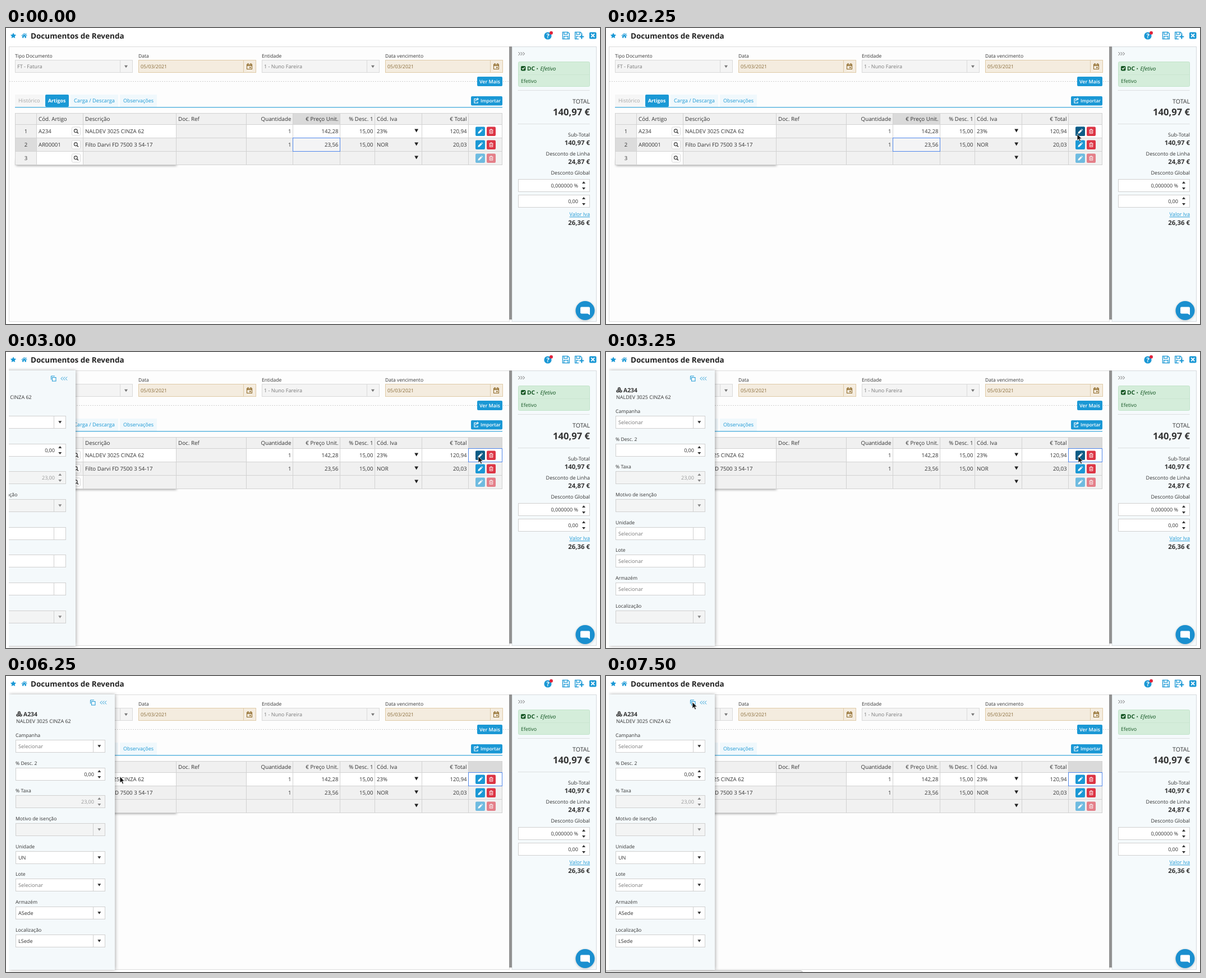
Write an HTML page that moves like this. It is 1059 px wide and 529 px high and loops after 8000 ms.

```html
<!DOCTYPE html>
<html lang="pt">
<head>
<meta charset="utf-8">
<title>Documentos de Revenda</title>
<style>
  html, body { margin: 0; width: 100%; height: 100%; overflow: hidden; background: #fff; }
  svg { display: block; width: 1059px; height: 529px; }
  text { font-family: "Open Sans", "Noto Sans", sans-serif; text-rendering: geometricPrecision; white-space: pre; }
</style>
</head>
<body>
<svg id="stage" viewBox="0 0 1059 529"></svg>
<script>
const LOOP = 8000;
const BLUE = '#1a98d5', RED = '#dc3545', INK = '#333', MUTED = '#777', LINE = '#d2d2d2';

// Drawing helpers: each returns SVG markup.
const rect = (x, y, w, h, fill, stroke = 'none', more = '') =>
  `<rect x="${x}" y="${y}" width="${w}" height="${h}" fill="${fill}" stroke="${stroke}" ${more}/>`;
const path = (d, fill, stroke = 'none', more = '') =>
  `<path d="${d}" fill="${fill}" stroke="${stroke}" ${more}/>`;
const line = (d, color, more = '') => path(d, 'none', color, more);
const text = (x, y, s, size = 9.1, fill = INK, more = '') =>
  `<text x="${x}" y="${y}" font-size="${size}" fill="${fill}" ${more}>${s}</text>`;
const right = (x, y, s, size = 9.1, fill = INK, more = '') =>
  text(x, y, s, size, fill, `text-anchor="end" ${more}`);
const group = (id, body, more = '') => `<g id="${id}" ${more}>${body}</g>`;
const at = (x, y, body) => `<g transform="translate(${x} ${y})">${body}</g>`;
const bold = 'font-weight="700"', semi = 'font-weight="600"', round = 'rx="2"';

const down = (x, y, color = INK, w = 3, h = 4.5) =>
  path(`M${x - w} ${y - h / 2}h${2 * w}l${-w} ${h}z`, color);
const up = (x, y, color) => down(x, y, color, 3, -4);
const spinner = (x, y, color) => up(x, y - 5.5, color) + down(x, y + 5.5, color, 3, 4);
const chevrons = (x, y, dir, color) => [0, 4, 8].map(d =>
  line(`M${x + d} ${y - 3}l${3 * dir} 3l${-3 * dir} 3`, color, 'stroke-width="1"')).join('');

function topBar() {
  const floppy = line('M.6 .6h9.4l2.6 2.6v9.6h-12zM3 .6v4h6v-4M3 12.8v-5h7v5', BLUE, 'stroke-width="1.3"');
  return path('M13 8.6l1.6 3.2 3.5.5-2.5 2.5.6 3.5-3.2-1.7-3.2 1.7.6-3.5-2.5-2.5 3.5-.5z', BLUE) +
    path('M32.5 9.2l5.2 4.6-.7.8-4.5-4-4.5 4-.7-.8zM29.1 14.4l3.4-3 3.4 3v3.4h-2.4v-2.6h-2v2.6h-2.4zM35 9.7h1.3v2.2l-1.3-1.1z', BLUE) +
    text(44, 18.7, 'Documentos de Revenda', 13.5, '#222', bold) +
    `<circle cx="966" cy="14" r="6.6" fill="${BLUE}"/>` +
    text(966, 18, '?', 11, '#fff', bold + ' text-anchor="middle"') +
    '<circle cx="972" cy="8.8" r="3" fill="#e0243c"/>' +
    at(991.8, 6.8, floppy) + at(1014, 6.8, floppy) +
    rect(1021, 12, 10, 9, '#fff') +
    line('M1026.3 11.5v8M1022.3 15.5h8', BLUE, 'stroke-width="2.2"') +
    rect(1040, 7.5, 12.5, 12, BLUE, 'none', round) +
    line('M1043.2 10.4l6 6M1049.2 10.4l-6 6', '#fff', 'stroke-width="2"');
}

function headField(x, label, value, isDate) {
  const [fill, edge, ink] = isDate ? ['#f4ecdf', '#dfcaa6', '#8a6d3b'] : ['#f4f4f4', '#d9d9d9', '#777'];
  const cx = x + 198;
  const calendar = rect(cx - 4.5, 65, 9, 8.5, 'none', '#8a6420') +
    line(`M${cx - 4.5} 67h9M${cx - 2.5} 63v2.5M${cx + 2.5} 63v2.5`, '#8a6420', 'stroke-width="1.4"') +
    rect(cx + .2, 69.5, 2.4, 2.2, '#8a6420');
  return text(x, 52.7, label, 8.6) + rect(x + .5, 57.5, 209, 22, fill, edge) +
    line(`M${x + 187.5} 58v21`, edge) + text(x + 4, isDate ? 72.2 : 72, value, isDate ? 8.9 : 9.1, ink) +
    (isDate ? calendar : down(cx, 69, '#777'));
}

function mainTop() {
  const importIcon = line('M839 126.5h-4v7.5h6v-2.5M837.5 131c0-3 1-4 4-4M840 125l2 2-2 2', '#fff', 'stroke-width="1.2"');
  return rect(5.5, 33.5, 892, 491, '#fdfdfd', '#dcdcdc') +
    headField(16, 'Tipo Documento', 'FT - Fatura') + headField(236, 'Data', '05/03/2021', true) +
    headField(456, 'Entidade', '1 - Nuno Fareira') + headField(676, 'Data vencimento', '05/03/2021', true) +
    line('M6 95.5H896', '#cfcfcf', 'stroke-dasharray="2 2"') +
    rect(840, 87, 45, 17, BLUE, 'none', round) + text(844, 98.6, 'Ver Mais', 8.9, '#fff', semi) +
    rect(16, 119, 51, 22, '#f6f6f6') + text(22, 133, 'Histórico', 9.3, '#a5a5a5') +
    rect(70, 119, 42, 22, BLUE, 'none', round) + text(75, 133, 'Artigos', 8.8, '#fff', bold) +
    rect(115, 119, 85, 22, '#f0f8fc') + text(121, 133, 'Carga / Descarga', 9.25, BLUE) +
    rect(203, 119, 66, 22, '#f0f8fc') + text(209, 133, 'Observações', 9, BLUE) +
    rect(16, 141, 869, 1.5, '#5db5e0') +
    rect(829, 122, 56, 16.5, BLUE, 'none', round) + importIcon + text(846, 133.2, 'Importar', 8.3, '#fff', semi);
}

const COLS = [16.5, 54.5, 137.5, 303.5, 428.5, 511.5, 595.5, 657.5, 741.5, 824.5, 884.5];
const ROWS = [172.5, 196.5, 220.5];
const cell = (c, y, h, fill, span = 1, stroke = LINE) =>
  rect(COLS[c], y, COLS[c + span] - COLS[c], h, fill, stroke);
const cells = (from, to, y, h, fill) => {
  let out = '';
  for (let c = from; c < to; c++) out += cell(c, y, h, fill);
  return out;
};

const pencil = path('M-4 4l.6-2.8L1.2-3.4 3.4-1.2-1.2 3.4zM1.9-4.1l.8-.7 2.1 2.1-.7.8z', '#fff');
const bin = line('M-3.5-2.5h7M-1.2-2.7v-1.2h2.4v1.2M-2.7-2.3v5.8h5.4v-5.8M-.9-.6v2.8M.9-.6v2.8', '#fff', 'stroke-width=".9"');
const editButton = (y, fill) => rect(837, y, 17, 16.5, fill, 'none', round) + at(845.4, y + 8.3, pencil);

function table() {
  const heads = [[1, 'Cód. Artigo'], [2, 'Descrição'], [3, 'Doc. Ref'], [4, 'Quantidade', 1],
    [5, '€ Preço Unit.', 1], [6, '% Desc. 1', 1], [7, 'Cód. Iva'], [8, '€ Total', 1]];
  const data = [
    ['A234', 'NALDEV 3025 CINZA 62', '', '1', '142,28', '15,00', '23%', '120,94'],
    ['AR00001', 'Filto Darvi FD 7500 3 54-17', '', '1', '23,56', '15,00', 'NOR', '20,03'],
    []];
  const place = (c, y, s, toRight, size) =>
    toRight ? right(COLS[c + 1] - 3, y, s, size) : text(COLS[c] + 3.5, y, s, size);

  let out = rect(18, 236, 286, 10, '#999', 'none', 'style="filter:blur(2px)"');
  out += cells(0, 10, 152.5, 20, '#f0f0f0');
  out += cells(0, 1, 172.5, 24, '#f0f0f0') + cells(1, 10, 172.5, 24, '#fff') + cell(3, 172.5, 24, '#f1f1f1');
  out += cells(0, 10, 196.5, 24, '#f0f0f0');
  out += cells(0, 10, 220.5, 24, '#f1f1f1') + cell(1, 220.5, 24, '#fff');
  out += group('pickedPrice', cell(5, 152.5, 20, '#dadada') + cell(0, 196.5, 24, '#dcdcdc') +
    cell(5, 196.5, 24, '#f4f4f5', 1, '#4f86ea'));
  out += group('pickedRow', cells(0, 10, 172.5, 24, '#f0f0f0') + cell(0, 172.5, 24, '#dcdcdc'));
  out += group('pickedTools', cell(9, 152.5, 20, '#dadada') + cell(9, 172.5, 24, 'none', 1, '#4f86ea'));
  heads.forEach(([c, s, r]) => out += place(c, 165.7, s, r, 9.8));

  ROWS.forEach((y, i) => {
    const base = y + 15;
    out += text(35.5, base, i + 1, 9.6, INK, 'text-anchor="middle"');
    data[i].forEach((s, k) => out += place(k + 1, base, s, [3, 4, 5, 7].includes(k), 9.7));
    out += rect(117.5, y + 4.5, 15, 15, '#fff', '#d8d8d8', round) +
      `<circle cx="124.3" cy="${y + 11.3}" r="2.9" fill="none" stroke="#333" stroke-width="1.1"/>` +
      line(`M126.4 ${y + 13.4}l2.6 2.6`, INK, 'stroke-width="1.4"') +
      down(731.7, y + 11, '#222', 3.4, 6);
    const tools = editButton(y + 4, BLUE) + rect(857, y + 4, 16, 16.5, RED, 'none', round) + at(865, y + 12.3, bin);
    out += `<g opacity="${i < 2 ? 1 : .6}">${tools}</g>`;
  });
  return out + group('pressed', editButton(176.5, '#0d5c86'));
}

function sideBar() {
  const spin = (y, s) => rect(913.5, y + .5, 127, 22, '#fff', '#d0d0d0') +
    right(1020, y + 15, s) + spinner(1030, y + 11.5, INK);
  const rule = y => line(`M913 ${y}H1041`, '#c4c4c4', 'stroke-dasharray="1 1"');
  const X = 1041;
  return rect(902, 33.5, 150.5, 491, '#f5fafc', '#d5dade') + rect(897, 33, 5, 488, '#929292') +
    chevrons(913.5, 46, 1, '#666') +
    rect(913.5, 60.5, 127, 44, '#d4edda', '#c1e3c9', round) + line('M914 83.5h126', '#cae6d1') +
    rect(918, 68, 8.5, 8.5, '#155724', 'none', round) + line('M920 72l1.7 1.8 3-3.4', '#fff', 'stroke-width="1.3"') +
    text(929, 76, 'DC', 10.2, '#155724', bold) + text(945.5, 76, '•', 9, '#155724') +
    text(952.5, 76, 'Efetivo', 9.6, '#155724', 'font-style="italic"') + text(918, 98, 'Efetivo', 8.9, '#155724') +
    rule(111.5) + right(X, 135, 'TOTAL', 10.6) + right(X, 155.7, '140,97 €', 16.6, INK, bold) + rule(171.5) +
    right(X, 194, 'Sub-Total', 9.05) + right(X, 209, '140,97 €', 11.4, INK, bold) +
    right(X, 228, 'Desconto de Linha', 9.05) + right(X, 243, '24,87 €', 11.4, INK, bold) +
    right(X, 262, 'Desconto Global', 9.05) + spin(270, '0,000000 %') + spin(298, '0,00') +
    right(X, 336.3, 'Valor Iva', 9.15, BLUE, 'text-decoration="underline"') +
    right(X, 351.5, '26,36 €', 11.4, INK, bold);
}

const chat = '<circle cx="1032.5" cy="506" r="17" fill="#000" opacity=".22" style="filter:blur(2px)"/>' +
  '<circle cx="1032.5" cy="505" r="17" fill="#1a8fcf"/>' +
  path('M1026 498.500h13a2 2 0 0 1 2 2v12.500l-4-2.500h-11a2 2 0 0 1-2-2v-8a2 2 0 0 1 2-2z', '#fff');

// Panel form: boxes share one left edge and one row pitch.
const fieldY = i => 114 + i * 49.65;
function box(i, s, { ink = INK, off = false, arrow = true } = {}) {
  const y = Math.round(fieldY(i)), fill = off ? '#f3f4f4' : '#fff';
  return rect(17.5, y + .5, 159, 22, fill, '#d0d0d0') + line(`M155.5 ${y + 1}v21`, '#d0d0d0') +
    text(22, y + 15, s, 9.1, ink) + (arrow ? down(166.3, y + 11.5, off ? '#888' : INK) : '');
}
function spinBox(i, s, off) {
  const y = Math.round(fieldY(i));
  return rect(17.5, y + .5, 159, 22, off ? '#f3f4f4' : '#fff', '#d0d0d0') +
    right(157, y + 15, s, 9.1, off ? '#999' : INK) + spinner(166.3, y + 11.5, off ? '#888' : INK);
}

function panel() {
  const labels = ['Campanha', '% Desc. 2', '% Taxa', 'Motivo de isenção', 'Unidade', 'Lote', 'Armazém', 'Localização'];
  const hint = { ink: MUTED }, waiting = { ink: MUTED, arrow: false };
  const cube = (x, y) => path(`M${x} ${y - 2.8}l2.6 1.2v3l-2.6 1.3-2.6-1.3v-3z`, '#333') +
    line(`M${x - 2} ${y - 1.2}l2 .9 2-.9M${x} ${y - .3}v2.5`, '#f4f9fb', 'stroke-width=".7"');
  return rect(5, 33, 189, 492, '#f4f9fb', 'none', 'style="filter:drop-shadow(1px 0 3px rgba(0,0,0,.32))"') +
    rect(152.500, 45.500, 6.500, 6.500, 'none', BLUE) + line('M150.500 49.500v-6.500h6.500', BLUE) +
    chevrons(171, 47.5, -1, BLUE) +
    cube(23.5, 65.6) + cube(20.9, 70) + cube(26.1, 70) +
    text(31, 71.5, 'A234', 10.4, INK, bold) + text(18, 84, 'NALDEV 3025 CINZA 62', 9) +
    labels.map((s, i) => text(17, fieldY(i) - 5, s, 8.7)).join('') +
    box(0, 'Selecionar', hint) + spinBox(1, '0,00') + spinBox(2, '23,00', true) + box(3, '', { off: true }) +
    box(4, 'Selecionar', waiting) + box(5, 'Selecionar', waiting) + box(6, 'Selecionar', waiting) +
    box(7, '', { off: true }) +
    group('lotReady', box(5, 'Selecionar', hint)) +
    group('storeReady', box(6, 'ASede') + box(7, 'LSede')) +
    group('unitReady', box(4, 'UN'));
}

const arrow = path('M1 .5v11.600l2.700-2.500 1.900 4.400 2-.9-1.900-4.200h3.600z', '#111', '#fff', 'stroke-width=".7"');

document.getElementById('stage').innerHTML =
  '<clipPath id="dock"><rect x="5" y="28" width="260" height="501"/></clipPath>' +
  rect(0, 0, 1059, 529, '#fff') + topBar() + mainTop() + table() + sideBar() + chat +
  `<g clip-path="url(#dock)">${group('panel', panel())}</g>` +
  group('status', path('M-1 530v-3.500h347q4 0 5 3.500z', '#e6e6e6', '#b5b5b5')) +
  group('cursor', arrow);

// Plays a table of [time, value] pairs as hard steps.
function play(id, prop, steps) {
  const frames = steps.map(([t, v]) => ({ offset: t / LOOP, [prop]: v, easing: 'step-end' }));
  frames.push({ offset: 1, [prop]: steps[steps.length - 1][1] });
  document.getElementById(id).animate(frames, { duration: LOOP, iterations: Infinity });
}
const show = (id, from, to) => {
  const steps = from ? [[0, 0], [from, 1]] : [[0, 1]];
  if (to) steps.push([to, 0]);
  play(id, 'opacity', steps);
};
const move = (x, y) => `translate(${x}px, ${y}px)`;

show('pickedPrice', 0, 2750);
show('pickedRow', 2750, 3000);
show('pickedTools', 2750);
show('pressed', 2250, 5000);
show('panel', 3000);
show('lotReady', 3750);
show('storeReady', 4250);
show('unitReady', 4750);
show('status', 7250);
show('cursor', 500);

play('panel', 'transform', [[0, move(-195, 0)], [3000, move(-70, 0)], [3250, move(0, 0)]]);
play('cursor', 'transform', [
  [0, 638, 61], [750, 685, 179], [1000, 747, 155], [1250, 812, 184], [1500, 842, 189],
  [1750, 841, 185], [2000, 838, 187], [2250, 839, 189], [2500, 841, 186], [5000, 682, 234],
  [5250, 548, 267], [5500, 543, 267], [6250, 202, 179], [6500, 196, 110], [6750, 161, 57],
  [7000, 153, 45], [7250, 153, 46]
].map(([t, x, y]) => [t, move(x, y)]));
</script>
</body>
</html>
```
